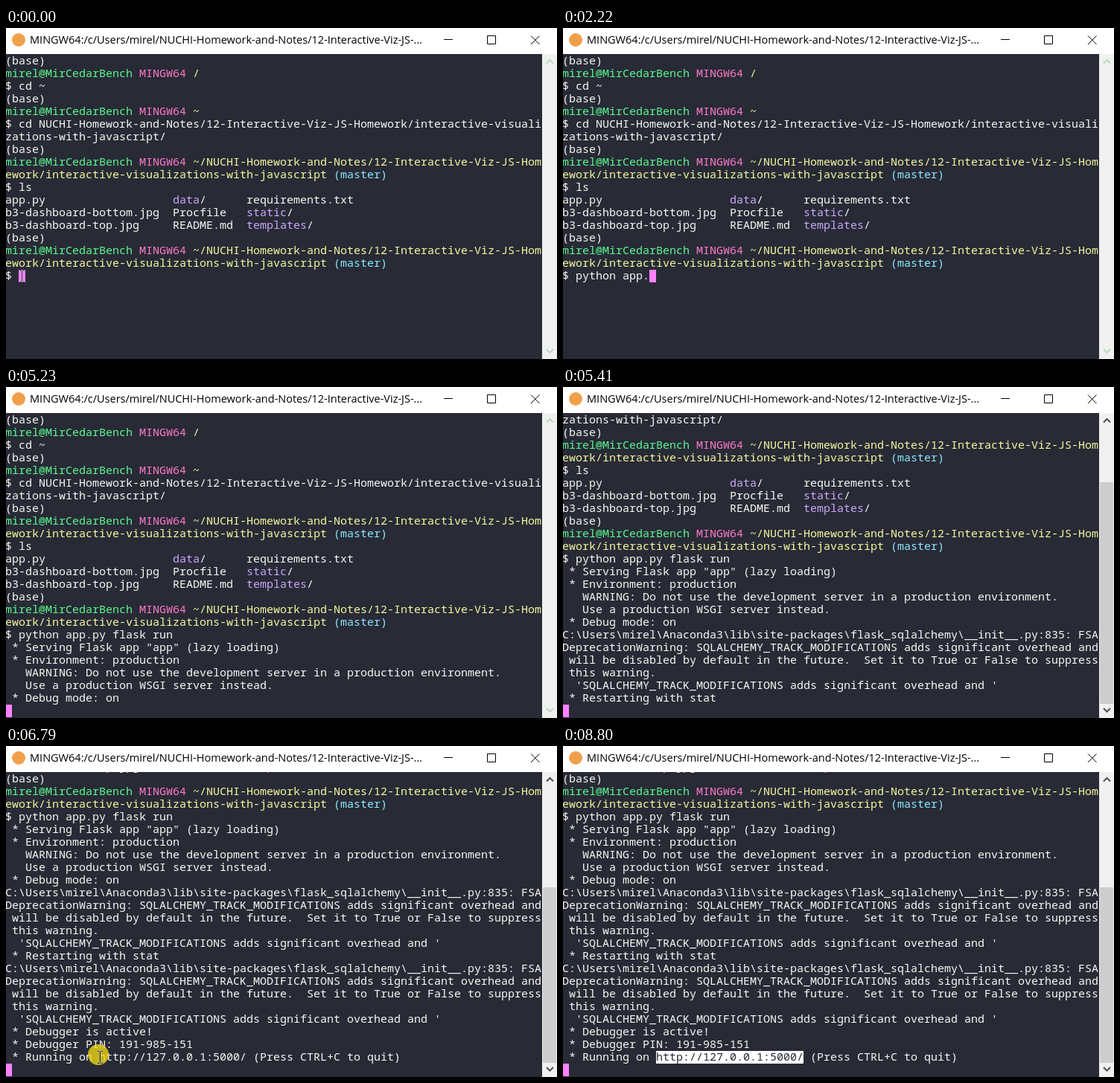
Write an HTML page that moves like this. It is 740 px wide and 445 px high and loops after 9.15 s.

```html
<!DOCTYPE html>
<html lang="en">
<head>
<meta charset="utf-8">
<title>Terminal</title>
<style>
html, body { margin: 0; width: 100%; height: 100%; overflow: hidden; background: #fff; }
#stage { position: relative; width: 740px; height: 445px; overflow: hidden; background: #fff; }
#stage > * { position: absolute; }
#title { left: 32px; top: 0; font: 14.5px/32px "Open Sans", "Noto Sans", sans-serif; color: #000; white-space: pre; }
#term { left: 0; top: 35px; width: 720px; height: 410px; overflow: hidden; background: #282a36; }
#text, #selection { font: 15px/17px "Noto Sans Mono", "DejaVu Sans Mono", monospace; font-variant-ligatures: none; white-space: pre; }
#text { position: absolute; left: -1px; margin: 0; color: #f8f8f2; }
#cursor { width: 9px; height: 17px; background: #ff80ff; }
#selection { left: 125px; top: 410px; height: 17px; line-height: 15px; overflow: hidden; background: #fff; color: #282a36; }
#bar { left: 720px; top: 35px; width: 20px; height: 410px; background: #f0f0f0; }
#thumb { left: 721px; width: 18px; background: #cdcdcd; }
#halo { width: 28px; height: 28px; border-radius: 50%; background: rgba(236, 214, 22, .8); }
#pointer { mix-blend-mode: difference; }
svg { overflow: visible; fill: none; }
.g { color: #5af78e } .m { color: #ff79c6 } .y { color: #f4f99d } .c { color: #8be9fd } .b { color: #caa9fa }
</style>
</head>
<body>
<div id="stage">
  <div id="title"></div>
  <div id="term"><pre id="text"></pre></div>
  <div id="cursor"></div>
  <div id="selection"></div>
  <div id="bar"></div>
  <div id="thumb"></div>
  <svg width="740" height="445">
    <circle cx="17" cy="16" r="9" fill="#f0a04b"/>
    <path d="M588 15.5h12M646.5 10.5h11v11h-11zM705 10.5l11.5 11.5M716.5 10.5l-11.5 11.5" stroke="#000"/>
    <path id="arrows" d="M726 47.5l4.5-4.5 4.5 4.5M726 432l4.5 4.5 4.5-4.5" stroke-width="2"/>
  </svg>
  <div id="halo"></div>
  <svg id="pointer" width="9" height="17"><path d="M1 .5h2.5l1 1 1-1H8M4.5 1.5v14M1 16.5h2.5l1-1 1 1H8" stroke="#ddd"/></svg>
</div>
<script>
const LOOP = 9150, ROWS = 24, CELL = 9, LINE = 17, TOP = 36;
const USER = 'mirel', HOST = 'MirCedarBench';
const $ = id => document.getElementById(id);
const ink = (cls, s) => `<span class="${cls}">${s}</span>`;
const prompt = (path, branch = '') =>
  `(base)\n${ink('g', USER + '@' + HOST)} ${ink('m', 'MINGW64')} ${ink('y', path)}${branch && ' ' + ink('c', branch)}\n$ `;

const repo = prompt('~/NUCHI-Homework-and-Notes/12-Interactive-Viz-JS-Hom\nework/interactive-visualizations-with-javascript', '(master)');
const history = prompt('/') + 'cd ~\n' + prompt('~') +
  'cd NUCHI-Homework-and-Notes/12-Interactive-Viz-JS-Homework/interactive-visuali\nzations-with-javascript/\n' +
  repo + 'ls\n' +
  `app.py                   ${ink('b', 'data')}/      requirements.txt\n` +
  `b3-dashboard-bottom.jpg  Procfile   ${ink('b', 'static')}/\n` +
  `b3-dashboard-top.jpg     README.md  ${ink('b', 'templates')}/\n` + repo;

const warning = [
  `C:\\Users\\${USER}\\Anaconda3\\lib\\site-packages\\flask_sqlalchemy\\__init__.py:835: FSA`,
  'DeprecationWarning: SQLALCHEMY_TRACK_MODIFICATIONS adds significant overhead and',
  ' will be disabled by default in the future.  Set it to True or False to suppress',
  ' this warning.',
  "  'SQLALCHEMY_TRACK_MODIFICATIONS adds significant overhead and '"
];
const output = [
  ' * Serving Flask app "app" (lazy loading)',
  ' * Environment: production',
  '   WARNING: Do not use the development server in a production environment.',
  '   Use a production WSGI server instead.',
  ' * Debug mode: on',
  ...warning, ' * Restarting with stat',
  ...warning, ' * Debugger is active!', ' * Debugger PIN: 191-985-151',
  ' * Running on http://127.0.0.1:5000/ (Press CTRL+C to quit)'
];
const command = 'python app.py flask run', url = 'http://127.0.0.1:5000/';

const keyTimes = [680, 770, 860, 950, 1040, 1130, 1220, 1360, 1790, 1920, 2220, 2460, 2660, 2900,
  3080, 3192, 3192, 3304, 3416, 3528, 3528, 3640, 3830];
const printed = [[5160, 2], [5230, 5], [5410, 11], [5730, 19]];   // time, lines of output
const ENTER = 4580, BLINK_FROM = 6260, BLINK = 508;
const gaps = [[430, 680], [4330, ENTER], [5090, 5160]];           // cursor hidden
const path = [[5730, 50, 317], [5940, 56, 317], [6330, 56, 317], [6700, 126, 418], [6830, 126, 418],
  [7170, 267, 418], [7370, 291, 418], [7930, 318, 418], [8260, 318, 418], [8380, 302, 418]];
const PRESS = 6760, DRAG = 6830, DRAG_END = 7930, RELEASE = 8260, POINTER_END = 8680;

const within = (t, [from, to]) => t >= from && t < to;
const show = (el, on) => { el.style.display = on ? '' : 'none'; };
const place = (el, x, y) => { el.style.left = x + 'px'; el.style.top = y + 'px'; };

function pointerAt(t) {
  if (t < path[0][0]) return [21.5, 333.5];
  const i = path.findIndex(p => p[0] > t);
  if (i < 0) return path[path.length - 1].slice(1);
  const [t0, x0, y0] = path[i - 1], [t1, x1, y1] = path[i], k = (t - t0) / (t1 - t0);
  return [Math.round(x0 + (x1 - x0) * k), Math.round(y0 + (y1 - y0) * k)];
}

let drawn = '';
function drawText(typed, lines, scroll) {
  const key = typed + ':' + lines;
  if (key === drawn) return;
  drawn = key;
  $('text').innerHTML = [history + command.slice(0, typed), ...output.slice(0, lines)].join('\n');
  $('text').style.top = -scroll * LINE + 'px';
  const track = 373, thumb = Math.round(track * ROWS / (ROWS + scroll));
  show($('thumb'), scroll > 0);
  $('thumb').style.top = 53 + track - thumb + 'px';
  $('thumb').style.height = thumb + 'px';
  $('arrows').setAttribute('stroke', scroll ? '#505050' : '#b4dcc0');
}

function render(t) {
  const typed = keyTimes.filter(k => k <= t).length;
  const lines = printed.reduce((n, [from, count]) => t >= from ? count : n, 0);
  const scroll = Math.max(0, lines + 18 - (ROWS - 1));
  drawText(typed, lines, scroll);

  const entered = t >= ENTER;
  const blinkedOff = t >= BLINK_FROM && Math.floor((t - BLINK_FROM) / BLINK) % 2 === 0;
  show($('cursor'), !blinkedOff && !gaps.some(g => within(t, g)));
  place($('cursor'), (entered ? 0 : 2 + typed) * CELL - 1, TOP + LINE * (entered ? 18 + lines - scroll : 17));

  const [x, y] = pointerAt(t);
  show($('pointer'), t < keyTimes[0] || within(t, [path[0][0], POINTER_END]));
  place($('pointer'), x - 4.5, y - 8.5);
  show($('halo'), within(t, [PRESS, RELEASE]));
  place($('halo'), x - 16, y - 17);

  const cells = t >= DRAG_END ? url.length : Math.ceil((x + 1) / CELL) - 14;
  show($('selection'), t > DRAG);
  $('selection').textContent = url.slice(0, Math.max(0, cells));
}

$('title').textContent = `MINGW64:/c/Users/${USER}/NUCHI-Homework-and-Notes/12-Interactive-Viz-JS-...`;
const start = performance.now();
function tick() {
  render((performance.now() - start) % LOOP);
  requestAnimationFrame(tick);
}
tick();
</script>
</body>
</html>
```
